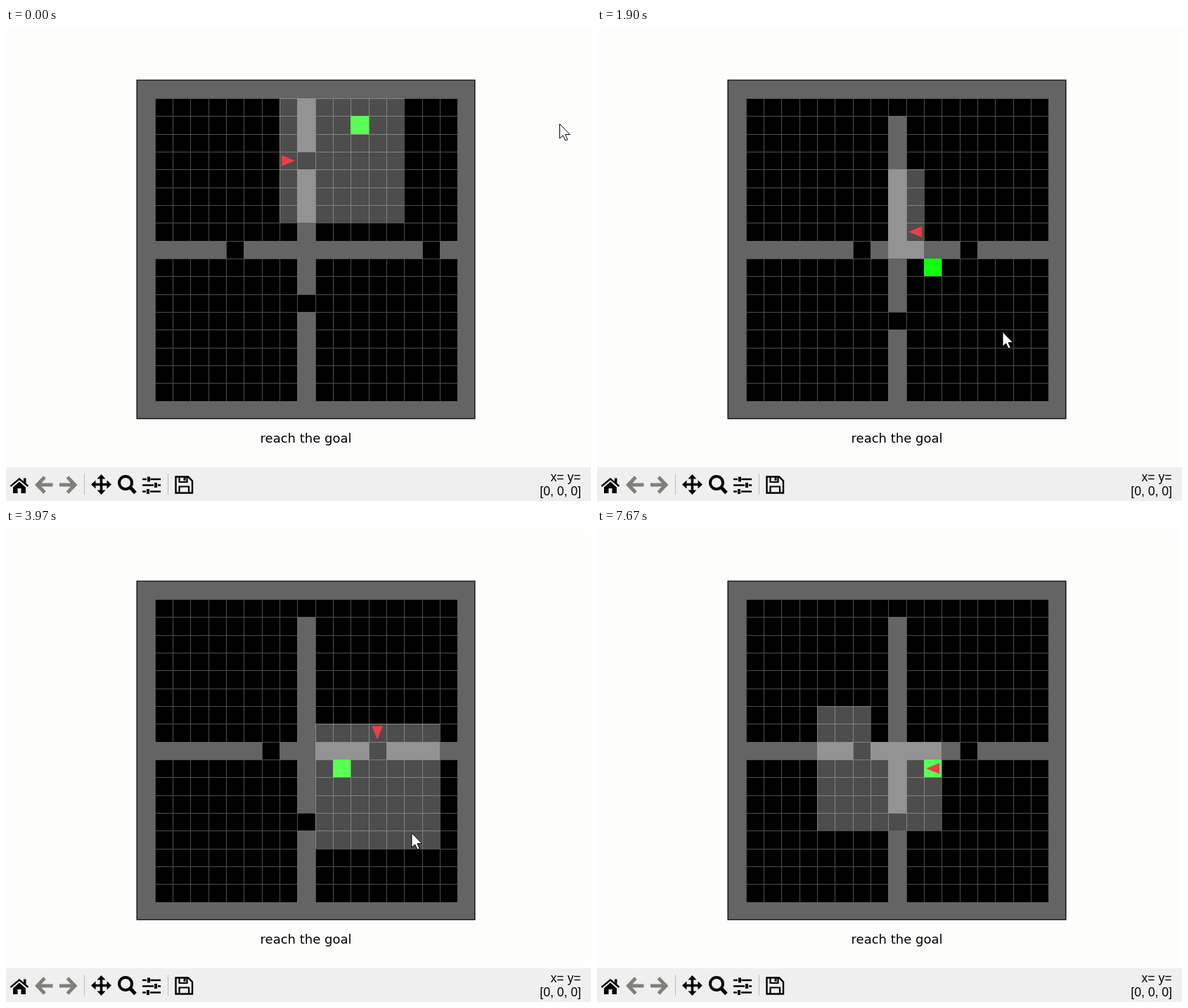
Write an HTML page with a canvas that moves like this. It is 832 px wide and 673 px high and loops after 8000 ms.

```html
<!DOCTYPE html>
<html lang="en">
<head>
<meta charset="utf-8">
<title>Four rooms</title>
<style>
  html, body { margin: 0; width: 832px; height: 673px; overflow: hidden; background: #fdfdfc; }
  canvas { display: block; }
</style>
</head>
<body>
<canvas id="stage" width="832" height="673"></canvas>
<script>
const ctx = document.getElementById('stage').getContext('2d');
const LOOP = 8000, SIZE = 19, CELL = 25.32, VIEW = 7, LEFT = 186.4, TOP = 74.8;
const px = col => Math.round(LEFT + col * CELL);
const py = row => Math.round(TOP + row * CELL);

// Doors are [column, row] gaps in the inner walls.
const first = { doors: [[9, 4], [9, 12], [5, 9], [16, 9]], goal: [12, 2] };
const second = { doors: [[9, 1], [9, 13], [7, 9], [13, 9]], goal: [11, 10] };

const DIRS = [[1, 0], [0, 1], [-1, 0], [0, -1]]; // east, south, west, north

// start time, room layout, column, row, direction
const poses = [
  [0, first, 8, 4, 0], [590, second, 12, 8, 3], [960, second, 12, 8, 2],
  [1330, second, 11, 8, 2], [1700, second, 10, 8, 2], [2100, second, 10, 8, 3],
  [2470, second, 10, 8, 0], [2830, second, 11, 8, 0], [3230, second, 12, 8, 0],
  [3600, second, 13, 8, 0], [3970, second, 13, 8, 1], [4370, second, 13, 9, 1],
  [4730, second, 13, 10, 1], [5070, second, 13, 10, 2], [5470, second, 12, 10, 2],
  [6100, second, 11, 10, 2]
];

// time, x, y of the mouse pointer; it leaves the stage on the right
const pointer = [
  [30, 787.5, 136.5], [880, 495.5, 248.5], [1320, 577, 432.5],
  [6640, 577, 432.5], [6800, 834, 400]
];

function isWall(room, x, y) {
  if (x <= 0 || y <= 0 || x >= SIZE - 1 || y >= SIZE - 1) return true;
  return (x === 9 || y === 9) && !room.doors.some(([dx, dy]) => dx === x && dy === y);
}

// Spreads sight row by row away from the agent; walls are seen but block.
function visibleCells(room, x, y, dir) {
  const [fx, fy] = DIRS[dir];
  const seen = Array.from({ length: VIEW }, () => Array(VIEW).fill(false));
  const toWorld = (side, ahead) =>
    [x + fx * ahead - fy * (side - 3), y + fy * ahead + fx * (side - 3)];
  const spread = (side, ahead, step) => {
    if (!seen[ahead][side] || isWall(room, ...toWorld(side, ahead))) return;
    seen[ahead][side + step] = true;
    if (ahead < VIEW - 1) seen[ahead + 1][side] = seen[ahead + 1][side + step] = true;
  };
  seen[0][3] = true;
  for (let ahead = 0; ahead < VIEW; ahead++) {
    for (let side = 0; side < VIEW - 1; side++) spread(side, ahead, 1);
    for (let side = VIEW - 1; side > 0; side--) spread(side, ahead, -1);
  }
  return seen.flatMap((line, ahead) =>
    line.flatMap((lit, side) => lit ? [toWorld(side, ahead)] : []))
    .filter(([cx, cy]) => cx >= 0 && cy >= 0 && cx < SIZE && cy < SIZE);
}

function fillCell(x, y, color) {
  ctx.fillStyle = color;
  ctx.fillRect(px(x), py(y), px(x + 1) - px(x), py(y + 1) - py(y));
}

function drawGrid([, room, x, y, dir]) {
  for (let row = 0; row < SIZE; row++) {
    for (let col = 0; col < SIZE; col++) {
      const wall = isWall(room, col, row);
      fillCell(col, row, wall ? '#646464' : '#000');
      if (wall) continue;
      ctx.fillStyle = '#4e4e4c';
      ctx.fillRect(px(col), py(row), px(col + 1) - px(col), 1);
      ctx.fillRect(px(col), py(row), 1, py(row + 1) - py(row));
    }
  }
  fillCell(...room.goal, '#12ff0a');
  for (const cell of visibleCells(room, x, y, dir)) fillCell(...cell, 'rgba(255,255,255,.3)');

  ctx.save();
  ctx.translate(LEFT + (x + .5) * CELL, TOP + (y + .5) * CELL);
  ctx.rotate(dir * Math.PI / 2);
  ctx.scale(CELL, CELL);
  ctx.fillStyle = '#f03c4a';
  ctx.fill(new Path2D('M-.38-.31L.37 0L-.38 .31Z'));
  ctx.restore();

  ctx.strokeStyle = '#0a0a0a';
  ctx.lineWidth = 1.4;
  ctx.strokeRect(186.2, 74.2, 480.6, 481.6);
}

function text(string, x, y, font, align) {
  ctx.font = font;
  ctx.textAlign = align;
  ctx.fillStyle = '#000';
  ctx.fillText(string, x, y);
}

function line(path, width, color = '#000') {
  ctx.strokeStyle = color;
  ctx.lineWidth = width;
  ctx.stroke(new Path2D(path));
}

function shape(path) {
  ctx.fillStyle = '#000';
  ctx.fill(new Path2D(path));
}

function drawToolbar() {
  ctx.fillStyle = '#efeff0';
  ctx.fillRect(0, 625, 832, 48);
  line('M111.5 634V664M230.5 634V664', 1, '#bcbcbc');
  // home
  line('M6.5 652L19 641.5L31.5 652', 2.4);
  shape('M10 653.5L19 645.5L28 653.5V662H21.5V655H16.5V662H10ZM25 640.5H28.5V648L25 645Z');
  // back and forward
  line('M55 639L44.5 650L55 661M45 650H66.5', 5, '#80807a');
  line('M87.5 639L98 650L87.5 661M97.5 650H76', 5, '#80807a');
  // pan
  line('M126 649.5H145M135.5 640V659', 3.6);
  shape('M121 649.5L127.5 643.5V655.5ZM150 649.5L143.5 643.5V655.5Z' +
    'M135.5 635L129.5 641.5H141.5ZM135.5 664L129.5 657.5H141.5Z');
  // zoom
  line('M179 647A9 9 0 1 1 161 647A9 9 0 1 1 179 647', 4);
  line('M176 653L184 661.5', 5);
  // sliders
  line('M194 642H200M205.5 642H220M194 650.5H210M216 650.5H220M194 659.5H199M205 659.5H220', 2.4);
  line('M203 638.5V645.5M213 647V654M202 656V663', 4);
  // save
  line('M241.5 638.5H259L265 644.5V661.5H241.5Z', 2.4);
  line('M246.5 638.5V646H257.5V638.5M246.5 661V652.5H260V661', 2.2);
  line('M254 639V644', 3);

  const font = '17.6px "Liberation Sans", Arial, sans-serif';
  text('x= y=', 817.5, 645, font, 'right');
  text('[0, 0, 0]', 818, 665, font, 'right');
}

function pointerAt(t) {
  if (t <= pointer[0][0]) return pointer[0].slice(1);
  const i = pointer.findIndex(key => key[0] > t);
  if (i < 0) return pointer.at(-1).slice(1);
  const [t0, x0, y0] = pointer[i - 1], [t1, x1, y1] = pointer[i];
  const p = (t - t0) / (t1 - t0), ease = p * p * (3 - 2 * p);
  return [x0 + (x1 - x0) * ease, y0 + (y1 - y0) * ease];
}

function drawPointer(t) {
  ctx.save();
  ctx.translate(...pointerAt(t));
  const arrow = 'M0 0V20.6L4.7 16.4L8.1 23.6L11.2 22.3L8 15.1H14.7Z';
  ctx.fillStyle = '#fff';
  ctx.fill(new Path2D(arrow));
  line(arrow, 1);
  ctx.restore();
}

function draw(now) {
  const t = now % LOOP;
  ctx.fillStyle = '#fdfdfc';
  ctx.fillRect(0, 0, 832, 673);
  drawGrid(poses.findLast(pose => pose[0] <= t));
  text('reach the goal', 426.5, 590, '18px "DejaVu Sans", sans-serif', 'center');
  drawToolbar();
  drawPointer(t);
}

const start = performance.now();
function tick() {
  draw(performance.now() - start);
  requestAnimationFrame(tick);
}
tick();
</script>
</body>
</html>
```
